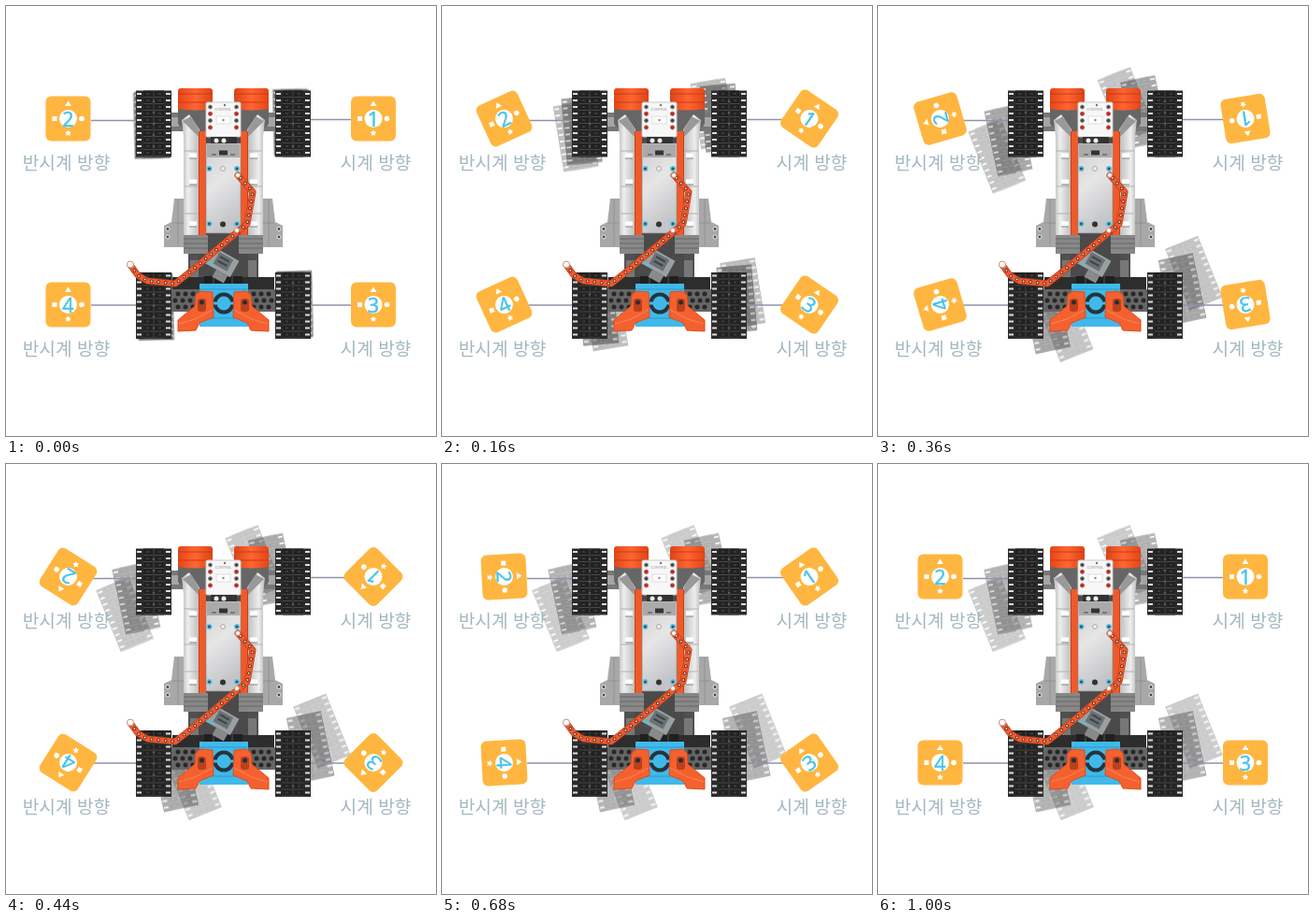
Write an HTML page that moves like this. It is 460 px wide and 460 px high and loops after 1040 ms.

```html
<!DOCTYPE html>
<html lang="ko">
<head>
<meta charset="utf-8">
<style>
html, body { margin: 0; width: 100%; height: 100%; overflow: hidden; background: #fff }
svg { display: block; width: 460px; height: 460px }
text { text-anchor: middle; font-family: "Noto Sans CJK KR", "Noto Sans CJK", "Noto Sans", sans-serif }
.label { font-size: 19.2px; fill: #a3b8c1 }
.digit { font-family: "Open Sans", "Noto Sans", sans-serif; font-size: 21.5px; fill: #45c3ea; stroke: #45c3ea; stroke-width: .5 }
.tiny { font: 4px Roboto, sans-serif; fill: #999 }
</style>
</head>
<body>
<svg viewBox="0 0 460 460">
  <defs>
    <linearGradient id="plate" x1="0" y1="0" x2=".3" y2="1">
      <stop offset="0" stop-color="#cfcfd1"/><stop offset=".5" stop-color="#e6e6e7"/><stop offset="1" stop-color="#c4c5c8"/>
    </linearGradient>
    <linearGradient id="tube">
      <stop offset="0" stop-color="#b8b8b8"/><stop offset=".35" stop-color="#eee"/><stop offset="1" stop-color="#bbb"/>
    </linearGradient>
    <linearGradient id="pipe">
      <stop offset="0" stop-color="#e64518"/><stop offset=".5" stop-color="#ff6532"/><stop offset="1" stop-color="#dc4417"/>
    </linearGradient>
    <g id="wheel"></g>
    <g id="wheels">
      <use href="#wheel" x="158" y="126"/><use href="#wheel" x="307" y="126"/>
      <use href="#wheel" x="158" y="320.5"/><use href="#wheel" x="307" y="320.5"/>
    </g>
    <path id="arm" d="M133 277l8 11 10 6 30 3 14-11 63-53 6-34-16-18"/>
    <g id="side">
      <path d="M177 114h16v20h-16z" fill="#777"/>
      <path d="M177 119h8v10h-8z" fill="#a5a5a5"/>
      <path d="M184 110h38v24h-30l-8-8z" fill="#666"/>
      <path d="M184 91q0-3 3-3h31q3 0 3 3v19q-18 3-37 0z" fill="url(#pipe)"/>
      <path d="M184 94h37M184 103h37" stroke="#c93c12"/>
      <path d="M190 206h-10l-3 25-8 4v23h23v-52z" fill="#a8a8a8"/>
      <path d="M184 207v50M178 232h13" fill="none" stroke="#929292"/>
      <path d="M190 245V140l-2-18 8-6 11 16v113z" fill="url(#tube)"/>
      <path d="M189 123l9-5 8 14v8z" fill="#999"/>
      <path d="M191 155h15M191 193h15M191 222h15" stroke="#b0b0b0"/>
      <path d="M196 160h8M196 188h8M196 233h8" stroke="#fff" stroke-width="5"/>
      <path d="M196 163h8M196 191h8M196 236h8" stroke="#888"/>
      <path d="M190 245h26v20h-26z" fill="#888"/>
      <path d="M190 249h26M190 254h26M190 259h26" stroke="#666"/>
      <path d="M177 303h32v24h-32z" fill="#666"/>
      <path d="M184 308h24M181 315h24M184 322h20" stroke="#282828" stroke-width="5" stroke-linecap="round" stroke-dasharray="0 8"/>
      <circle cx="173" cy="238.500" r="2" fill="#444" stroke="#eee"/>
      <circle cx="173" cy="247" r="2" fill="#444" stroke="#eee"/>
    </g>
    <g id="foot">
      <path d="M203 309l5-4 13 1 1 27-15 6-4 8-19 1v-12l18-15z" fill="#f4612f" stroke="#dc4c20"/>
      <path d="M185 340l17-5 19-10" fill="none" stroke="#ff8258"/>
      <rect x="205" y="313" width="9" height="14" rx="3" fill="#b9411d"/>
      <path d="M209.500 317v6" stroke="#292e35" stroke-width="5" stroke-linecap="round" stroke-dasharray="0 6"/>
    </g>
  </defs>
  <use id="far" href="#wheels"/>
  <use id="near" href="#wheels"/>
  <path d="M91 122.500h50M324 121.500h46M91 320h50M324 320h46" stroke="#9192a8" stroke-width="1.500"/>
  <use href="#wheels"/>

  <path d="M195 245h75v58h-75z" fill="#505050"/>
  <path d="M178 290h109v13h-109z" fill="#2d2d2d"/>
  <path d="M197 272h20v18h-20zM249 272h19v18h-19z" fill="#777"/>
  <path d="M206 110h53v180h-53z" fill="#4a4a4a"/>
  <use href="#side"/>
  <use href="#side" transform="matrix(-1 0 0 1 465 0)"/>
  <path d="M206 134h8v111h-8zM251 134h8v111h-8z" fill="#f05a2a"/>
  <path d="M206.500 134v111M258.500 134v111" stroke="#c6421a"/>
  <path d="M214 147h37v96h-37z" fill="url(#plate)" stroke="#888" stroke-width=".7"/>
  <path d="M215 148h35v14h-35z" fill="#aaa"/>
  <path d="M228 157h9" stroke="#333" stroke-width="5"/>
  <path d="M220 159h5M240 159h5" stroke="#777" stroke-width="2"/>
  <circle cx="232" cy="174" r="2.500" fill="#eee" stroke="#aaa"/>
  <g fill="#35535f" stroke="#5fc6e5" stroke-width="1.500">
    <circle cx="217.500" cy="174" r="2.300"/><circle cx="247" cy="174" r="2.300"/>
    <circle cx="217.500" cy="233" r="2.300"/><circle cx="247" cy="233" r="2.300"/>
  </g>
  <circle cx="232" cy="233.500" r="3" fill="#333"/>
  <rect x="214" y="103" width="37" height="37" rx="1.500" fill="#f7f7f7" stroke="#ccc"/>
  <text class="tiny" x="232.500" y="112">CONTROL</text>
  <circle cx="234" cy="106" r="1.200" fill="#777"/>
  <rect x="225" y="118" width="15" height="8" fill="#fff" stroke="#ddd"/>
  <circle cx="232.500" cy="122" r="1.200" fill="#888"/>
  <g id="ports"></g>
  <path d="M219 140h28v7h-28z" fill="#333"/>
  <path d="M225 144h16" stroke="#eee" stroke-width="5" stroke-linecap="round" stroke-dasharray="0 8"/>

  <path d="M207 297h52v46h-52z" fill="#40b9ea"/>
  <path d="M207 303h52M214 334h38" stroke="#269bc9"/>
  <path d="M212 289h41v8h-41z" fill="#202020"/>
  <path d="M222 289v8M242 289v8" stroke="#555"/>
  <circle cx="233" cy="318" r="9.500" fill="#40b9ea" stroke="#24343d" stroke-width="4"/>
  <path d="M220 318h6M240 318h6" stroke="#40b9ea" stroke-width="3"/>
  <use href="#foot"/>
  <use href="#foot" transform="matrix(-1 0 0 1 465 0)"/>

  <g transform="translate(231 275) rotate(29)">
    <path d="M-15-11h30v20h-30z" fill="#9aa0a2"/>
    <path d="M-8-9h17v14h-17z" fill="#6a7174"/>
    <path d="M-5-5h11M-5 0h11" stroke="#3c4245" stroke-width="2"/>
    <path d="M-15 7h9" stroke="#61bdd5" stroke-width="2"/>
    <path d="M-2 9h14v9h-14z" fill="#8a8a8a"/>
  </g>
  <g fill="none" stroke-linecap="round" stroke-linejoin="round">
    <use href="#arm" stroke="#b9421f" stroke-width="7"/>
    <use href="#arm" stroke="#f4592b" stroke-width="5.500"/>
    <use href="#arm" stroke="#6b2c1f" stroke-width="4" stroke-dasharray="0 7.500"/>
    <use href="#arm" stroke="#eadbd6" stroke-width="2" stroke-dasharray="0 7.500"/>
  </g>
  <g fill="#fff" stroke="#c9907c">
    <circle cx="133" cy="276.500" r="3.500"/><circle cx="248" cy="181" r="2.500"/><circle cx="247" cy="240" r="2.500"/>
  </g>
  <g id="icons"></g>
</svg>
<script>
const $ = id => document.getElementById(id);
const rect = (x, y, w, h, fill) => `<rect x="${x}" y="${y}" width="${w}" height="${h}" fill="${fill}"/>`;

let tread = rect(-19, -35.5, 38, 71, '#2b2b2b') + rect(-11, -35.5, 22, 71, '#222');
for (let i = 0; i < 10; i++) {
  const y = -33 + i * 7;
  tread += rect(-18, y, 5, 2, '#ddd') + rect(13, y, 5, 2, '#ddd') +
    rect(-11, y + 4, 22, 1, '#484848') + rect(-8, y, 3, 2, '#3a3a3a') + rect(5, y, 3, 2, '#3a3a3a');
}
$('wheel').innerHTML = tread + rect(-1, -35, 2, 70, '#333') +
  '<path d="M0-24V25" stroke="#5c5c5c" stroke-width="2.500" stroke-linecap="round" stroke-dasharray="0 12"/>';

for (const x of [218.5, 246.5])
  for (let i = 0; i < 4; i++)
    $('ports').innerHTML += `<circle cx="${x}" cy="${108 + i * 7.3}" r="2.100" fill="${i % 2 ? '#a3302b' : '#444'}" stroke="${i % 2 ? '#d8554a' : '#999'}"/>`;

// Digit, centre, turning direction
const motors = [[1, 393, 120.5, 1], [2, 66.5, 120.5, -1], [3, 393, 319.5, 1], [4, 66.5, 319.5, -1]];
const star = Array.from({ length: 10 }, (_, i) => {
  const r = i % 2 ? 1.8 : 3.6, a = i * Math.PI / 5;
  return `${r * Math.sin(a)},${15.5 - r * Math.cos(a)}`;
}).join(' ');
$('icons').innerHTML = motors.map(([n, x, y, dir]) => `
  <g transform="translate(${x} ${y})"><g id="motor${n}">
    <rect x="-24" y="-24" width="48" height="48" rx="6" fill="#ffb640"/>
    <g fill="#fff"><circle r="9.500"/><path d="M0-19l3.500 5.500h-7z"/>
    <rect x="-17" y="-2.500" width="5" height="5"/><circle cx="14.500" r="2.800"/><polygon points="${star}"/></g>
    <text class="digit" y="8">${n}</text>
  </g></g>
  <text class="label" x="${dir < 0 ? 64.5 : 395.5}" y="${y + 54}">${dir < 0 ? '반시계' : '시계'} 방향</text>`).join('');

const clamp = v => Math.min(1, Math.max(0, v));
const smooth = s => s * s * (3 - 2 * s);

// Bezier easing (.33, 0, .33, 1), solved by bisection
function early(x) {
  let lo = 0, hi = 1;
  for (let i = 0; i < 24; i++) {
    const s = (lo + hi) / 2;
    if (0.99 * s * (1 - s) + s ** 3 < x) lo = s; else hi = s;
  }
  return smooth(lo);
}

function ghost(id, angle, opacity) {
  $(id).setAttribute('transform', `rotate(${-angle} 232.5 223)`);
  $(id).setAttribute('opacity', opacity);
}

function draw(now) {
  const t = Math.floor(now % 1040 / 40) * 40;
  const p = clamp(t / 1000), fade = clamp(t / 560);
  const swing = 1.5 + 20.5 * smooth(clamp(t / 380));
  for (const [n, , , dir] of motors)
    $('motor' + n).setAttribute('transform', `rotate(${360 * (dir > 0 ? early(p) : -smooth(p))})`);
  ghost('near', swing * 0.55, 0.5 - 0.14 * fade);
  ghost('far', swing, 0.34 - 0.1 * fade);
  requestAnimationFrame(draw);
}
requestAnimationFrame(draw);
</script>
</body>
</html>
```
